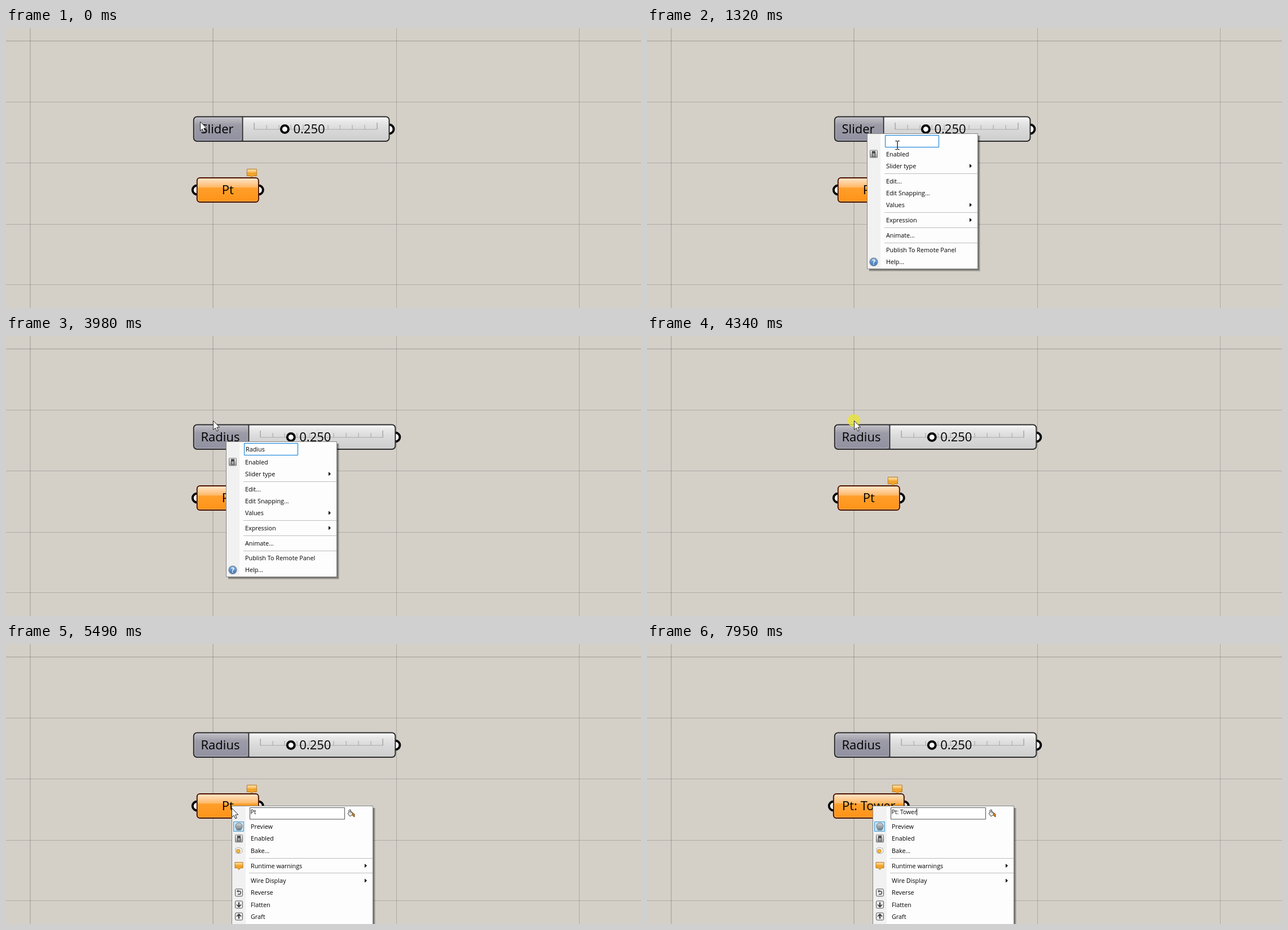
These frames come from a looping animation (1126x497 px, 8000 ms). An HTML page with a canvas:

```html
<!DOCTYPE html>
<html lang="en">
<head>
<meta charset="utf-8">
<style>
  html, body { margin: 0; width: 100%; height: 100%; overflow: hidden; background: #d4d0c8; }
  canvas { display: block; }
</style>
</head>
<body>
<canvas id="stage" width="1126" height="497"></canvas>
<script>
const ctx = document.getElementById('stage').getContext('2d');
const LOOP = 8000;
const BIG = '22px "Open Sans", "Noto Sans", sans-serif';
const SMALL = '10.8px "Open Sans", "Noto Sans", sans-serif';
const FIELD = '10.4px "Open Sans", "Noto Sans", sans-serif';

// Value of the last [time, value] entry already reached.
const latest = (list, t) => list.reduce((value, [at, next]) => t >= at ? next : value, undefined);
const within = (t, spans) => spans.some(([from, to]) => t >= from && t < to);

const sliderNames = [[0, 'Slider'], [2320, 'R'], [2540, 'Ra'], [2670, 'Rad'],
  [2890, 'Radi'], [3040, 'Radiu'], [3260, 'Radius']];
const pointNames = [[0, 'Pt'], [7290, 'Pt:'], [7360, 'Pt: '], [7660, 'Pt: T'],
  [7730, 'Pt: To'], [7880, 'Pt: Tow'], [7950, 'Pt: Tower']];
const cursorShapes = [[0, 'arrow'], [1320, 'beam'], [2320, 'none'], [3980, 'arrow'],
  [5770, 'beam'], [7290, 'none']];
const clicks = [[590, 740], [1530, 1680], [4340, 4490], [5340, 5490], [6060, 6210]];
const carets = [[1530, 2040], [2320, 3760], [6060, 6640], [7140, LOOP]];

// Each move: first step, step length, number of steps, destination.
const moves = [
  [80, 72.5, 5, 398, 190], [520, 1, 1, 390, 187], [820, 70, 5, 440, 208],
  [1320, 1, 1, 444, 208], [1420, 1, 1, 441.5, 206], [3980, 1, 1, 367, 150],
  [4560, 80, 8, 400, 291], [5700, 70, 3, 467.5, 301.5]
];

function cursorAt(t) {
  let x = 344, y = 166;
  for (const [start, step, count, toX, toY] of moves) {
    if (t < start) break;
    const p = Math.min(1, (Math.floor((t - start) / step + 1e-6) + 1) / count);
    const eased = p * p * (3 - 2 * p);
    x += (toX - x) * eased;
    y += (toY - y) * eased;
  }
  return [x, y];
}

function text(str, x, y, font = SMALL, color = '#000') {
  ctx.font = font;
  ctx.fillStyle = color;
  ctx.fillText(str, x, y);
}

function measure(str, font) {
  ctx.font = font;
  return ctx.measureText(str).width;
}

function rect(x, y, w, h, fill, stroke, width = 1, radius = 0) {
  ctx.beginPath();
  ctx.roundRect(x, y, w, h, radius);
  paint(fill, stroke, width);
}

function circle(x, y, r, fill, stroke, width) {
  ctx.beginPath();
  ctx.arc(x, y, r, 0, 7);
  paint(fill, stroke, width);
}

function path(points, fill, stroke, width = 1, close = true) {
  ctx.beginPath();
  points.forEach(([x, y]) => ctx.lineTo(x, y));
  if (close) ctx.closePath();
  paint(fill, stroke, width);
}

function paint(fill, stroke, width = 1) {
  if (fill) { ctx.fillStyle = fill; ctx.fill(); }
  if (stroke) { ctx.strokeStyle = stroke; ctx.lineWidth = width; ctx.stroke(); }
}

function vertical(y0, y1, ...stops) {
  const gradient = ctx.createLinearGradient(0, y0, 0, y1);
  stops.forEach(([at, color]) => gradient.addColorStop(at, color));
  return gradient;
}

function bar(x, y, w, h, color) {
  ctx.fillStyle = color;
  ctx.fillRect(x, y, w, h);
}

const port = (x, y) => circle(x, y, 8, '#fff', '#000', 4);

function drawGrid() {
  bar(0, 0, 1126, 497, '#d4d0c8');
  bar(0, 22, 1126, 2, 'rgba(0,0,0,.13)');
  for (const y of [131, 239, 348, 455]) bar(0, y, 1126, 1, 'rgba(0,0,0,.18)');
  for (const x of [42, 366]) bar(x, 0, 2, 497, 'rgba(0,0,0,.13)');
  for (const x of [692, 1016]) bar(x, 0, 1, 497, 'rgba(0,0,0,.18)');
}

function drawSlider(name) {
  const left = 332.8, top = 157.5, height = 43.5;
  const divider = 361.5 + measure(name, BIG);
  const right = Math.max(679.5, divider + 260);
  port(right, 179.5);

  ctx.save();
  ctx.beginPath();
  ctx.roundRect(left, top, right - left, height, 6);
  ctx.clip();
  bar(left, top, right - left, height, vertical(157, 201, [0, '#fff'], [.2, '#e8e8e8'], [.5, '#dadada'], [1, '#cdcdcd']));
  bar(left, top, divider - left, height, vertical(157, 201, [0, '#c4c3ca'], [.25, '#a9a8b1'], [.34, '#9c9ba7'], [1, '#9190a0']));
  rect(left + 1.8, top + 1.8, divider - left - 3.3, height - 3.6, null, 'rgba(255,255,255,.3)', 1, 5);
  ctx.restore();
  bar(divider - 1, top, 2, height, '#333');
  rect(left, top, right - left, height, null, '#2c2c2c', 2, 6);

  const start = divider + 20.5, length = right - 22 - start;
  bar(start, 179.5, length, 1, '#acacac');
  for (let i = 0; i <= 10; i++) {
    const isEnd = i % 10 === 0;
    bar(Math.round(start + length * i / 10) - .5, isEnd ? 168 : 172, 1.2, isEnd ? 12 : 8, isEnd ? '#979797' : '#acacac');
  }
  const knob = start + length / 4;
  circle(knob, 179.5, 6.5, '#fff', '#000', 4);
  text('0.250', knob + 15, 187, BIG);
  text(name, 345.5, 187, BIG);
}

function balloon(x, y, w = 17, h = 12) {
  const l = x - w / 2, r = x + w / 2, b = y + h;
  path([[l, y], [r, y], [r, b], [x + 3, b], [x, b + 3], [x - 3, b], [l, b]],
    vertical(y, b, [0, '#ffe3b0'], [.45, '#f9bd5c'], [.55, '#f3a32b'], [1, '#f0a52e']), '#b4771c');
}

function drawPoint(name) {
  const center = 393.3, textWidth = measure(name, BIG);
  const width = Math.max(109, textWidth + 30.5);
  const left = center - width / 2, right = center + width / 2;
  port(left, 287.5);
  port(right, 287.5);
  rect(left, 266, width, 43, vertical(266, 309, [0, '#ffe9cf'], [.12, '#ffd9ad'], [.39, '#ffb868'], [.41, '#ff9f2b'], [1, '#ff9217']), '#4d1000', 2, 5);
  rect(left + 1.6, 267.6, width - 3.2, 39.8, null, 'rgba(255,225,180,.4)', 1, 4);
  text(name, center - textWidth / 2, 295, BIG);
  balloon(right - 12, 250.5);
}

function drawMenu(x, y, w, h, gutter, items, separators) {
  for (let i = 4; i > 0; i--) bar(x + 4, y + 4, w - 4 + i, h - 4 + i, 'rgba(0,0,0,.15)');
  rect(x + .5, y + .5, w - 1, h - 1, '#fdfdfd', '#858585');
  bar(x + 1, y + 1, gutter, h - 2, '#f1f1f1');
  for (const sy of separators) bar(x + 31, sy, w - 32, 1, '#bdbdbd');
  for (const [label, center, hasArrow] of items) {
    text(label, x + 34, center + 4);
    const ax = x + w - 15;
    if (hasArrow) path([[ax, center - 3.5], [ax + 4, center], [ax, center + 3.5]], '#000');
  }
}

function switchIcon(x, y) {
  rect(x - 6.5, y - 6.5, 13, 13, vertical(y - 6, y + 6, [0, '#eee'], [1, '#999']), '#777', 1, 1);
  bar(x - 3, y - 5, 6, 10, '#444');
  bar(x - 2, y - 1, 4, 5, '#aaa');
}

function arrowIcon(x, y, kind) {
  rect(x - 6.5, y - 6.5, 13, 13, '#e9e9e9', '#555', 1, 2);
  if (kind === 'reverse') {
    path([[x - 3, y - 2.5], [x + 2, y - 2.5], [x + 3.5, y], [x + 2, y + 3], [x - 2, y + 3]], null, '#444', 1.4, false);
    path([[x - 4, y - 2.5], [x - 1, y - 5], [x - 1, y]], '#444');
    return;
  }
  const d = kind === 'flatten' ? 1 : -1;
  bar(x - 1, y - 4, 2, 8, '#333');
  path([[x - 4, y], [x, y + 4 * d], [x + 4, y]], null, '#333', 1.6, false);
}

function drawCaret(x, y, h) { bar(x, y, 1, h, '#000'); }

function drawSliderMenu(t, name) {
  drawMenu(390, 187, 197, 241, 23, [
    ['Enabled', 223.5], ['Slider type', 244.7, true], ['Edit...', 271.5], ['Edit Snapping...', 292.8],
    ['Values', 314, true], ['Expression', 340.8, true], ['Animate...', 367.5],
    ['Publish To Remote Panel', 394], ['Help...', 415.3]
  ], [258, 327, 354, 381]);
  rect(422.5, 190.5, 95, 21, '#fff', t < 1320 ? '#7a7a7a' : '#0078d7');
  const value = t < 2320 ? '' : name;
  text(value, 425, 204.5);
  if (within(t, carets)) drawCaret(Math.round(425 + measure(value, SMALL)), 193, 14);
  switchIcon(402, 223.5);
  circle(402, 415.3, 7, vertical(408, 423, [0, '#8db9e6'], [1, '#2f68ae']), '#7d8fa5', 1.5);
  text('?', 399.2, 420, 'bold 12px "Open Sans", sans-serif', '#fff');
}

function drawPointMenu(t, name) {
  drawMenu(400, 287, 251, 240, 24, [
    ['Preview', 324], ['Enabled', 345.3], ['Bake...', 366.5], ['Runtime warnings', 393.5, true],
    ['Wire Display', 420, true], ['Reverse', 441.3], ['Flatten', 462.5], ['Graft', 483.6]
  ], [380, 406]);
  rect(432.5, 290.5, 168, 20.5, '#fff', '#505050');
  text(name, 433.5, 302.3, FIELD);
  if (within(t, carets)) drawCaret(Math.round(433.2 + measure(name, FIELD)), 292, 12);

  // paint bucket
  path([[606, 301], [611, 296], [616, 302], [610, 306]], '#e4e4e4', '#444');
  path([[608, 299], [608, 295], [611, 294], [612, 300]], null, '#444', 1, false);
  path([[614, 299], [618, 302], [618, 307], [615, 305]], '#d98a20', '#714a16');

  rect(403.5, 315.5, 18, 17, '#c5e3f6', '#3d98d1');
  circle(413, 323.5, 6, vertical(317, 330, [0, '#ddd'], [1, '#6f7b82']), '#6a747a', 1);
  path([[407, 328], [412, 330], [419, 327], [416, 331], [410, 331]], '#737d84');
  switchIcon(413, 345.3);
  path([[407, 363], [412, 361], [418, 363], [419, 369], [415, 372], [408, 371]], '#fafafa', '#aaa');
  circle(412, 367.5, 3.3, '#f4b83b', '#c8882a', 1);
  balloon(413, 387.5, 14, 10);
  arrowIcon(413, 441.3, 'reverse');
  arrowIcon(413, 462.5, 'flatten');
  arrowIcon(413, 483.6, 'graft');
}

function drawCursor(t) {
  const shape = latest(cursorShapes, t);
  const [x, y] = cursorAt(t);
  if (within(t, clicks)) circle(x, y, 11.3, 'rgba(232,226,66,.85)');
  if (shape === 'arrow') {
    const outline = [[0, 0], [0, 16], [3.7, 12.6], [6.3, 18.4], [8.8, 17.3], [6.3, 11.6], [11.3, 11.4]];
    path(outline.map(([dx, dy]) => [x + .5 + dx, y + .5 + dy]), '#fff', '#222');
  } else if (shape === 'beam') {
    bar(x - .5, y - 7, 1.2, 14, '#000');
    for (const dy of [-8, 7]) {
      bar(x - 3.5, y + dy, 3, 1.2, '#000');
      bar(x + .7, y + dy, 3, 1.2, '#000');
    }
  }
}

function draw(t) {
  const sliderName = latest(sliderNames, t), pointName = latest(pointNames, t);
  drawGrid();
  drawSlider(sliderName);
  drawPoint(pointName);
  if (t >= 660 && t < 4340) drawSliderMenu(t, sliderName);
  if (t >= 5410) drawPointMenu(t, pointName);
  drawCursor(t);
}

const began = performance.now();
function tick() {
  draw((performance.now() - began) % LOOP);
  requestAnimationFrame(tick);
}
tick();
</script>
</body>
</html>
```
